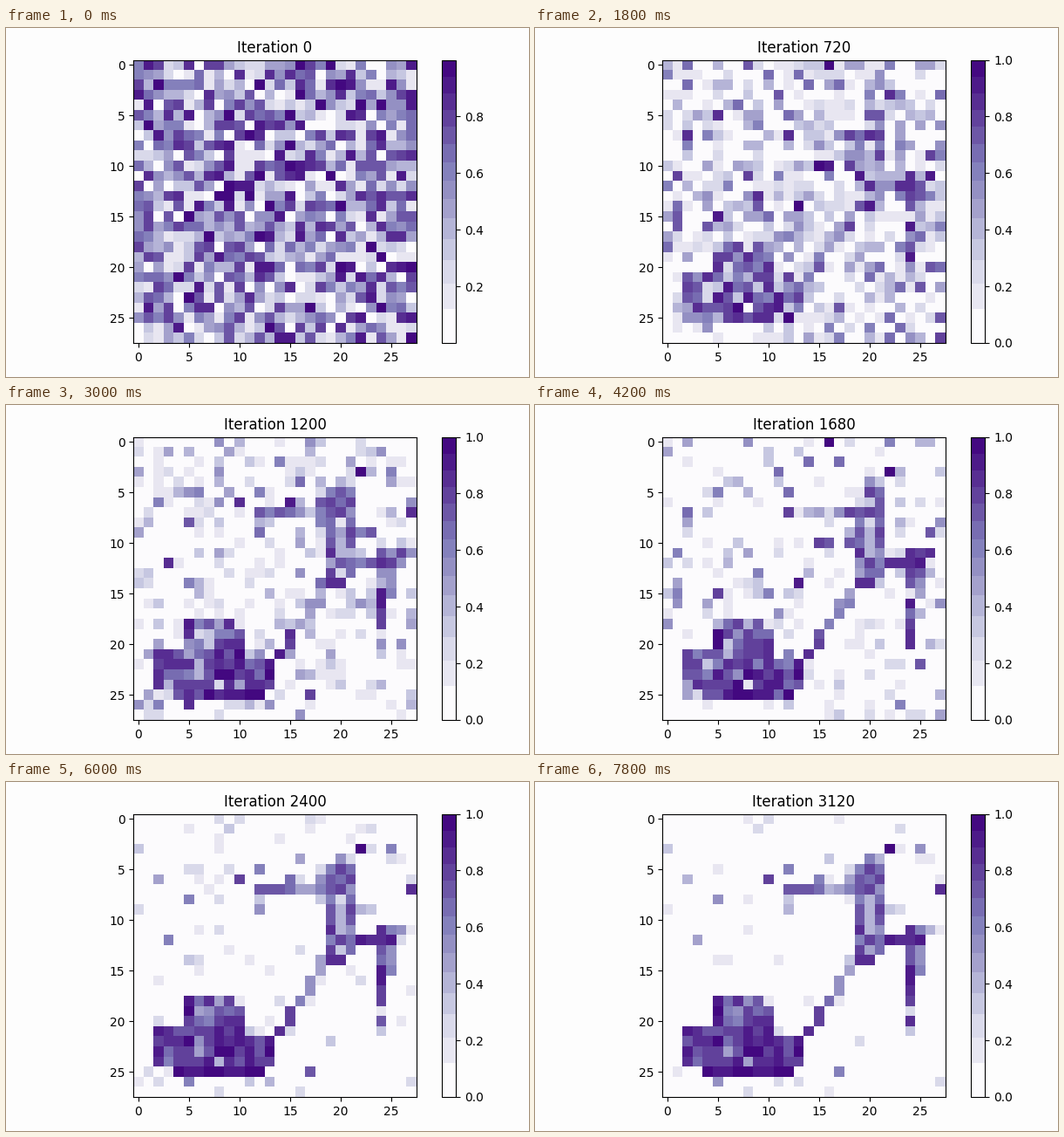
A matplotlib script for the animation above (8 s loop, 600 px wide and 400 px high).

```python
import numpy as np
import matplotlib.pyplot as plt
from matplotlib.animation import FuncAnimation
from matplotlib.colors import ListedColormap

SIZE, FRAMES, STEP = 28, 40, 80
W, H = 600, 400


def banded_purples(count=14):
    """Purples in flat bands, wider towards the light end."""
    x = np.linspace(0, 1, 512)
    band = np.minimum(np.floor(x ** 1.25 * count), count - 1)
    shade = np.where(band > 0, ((band + .5) / count) ** .8, 0)
    return ListedColormap(plt.colormaps["Purples"](shade))


def sandal(rng):
    img = np.zeros((SIZE, SIZE))

    def part(rows, cols, low, high):
        """Fill a block of cells, last row and column included."""
        (r0, r1), (c0, c1) = rows, cols
        shape = (r1 - r0 + 1, c1 - c0 + 1)
        img[r0:r1 + 1, c0:c1 + 1] = rng.uniform(low, high, shape)

    def slope(start, end, low, high):
        """Shade a slanted run of cells, one per row."""
        (r0, c0), (r1, c1) = start, end
        for t in np.linspace(0, 1, r1 - r0 + 1):
            row, col = r0 + (r1 - r0) * t, c0 + (c1 - c0) * t
            img[round(row), round(col)] = low + (high - low) * t

    # toe
    part((18, 20), (5, 9), .5, .85)
    part((18, 20), (5, 5), .85, 1)
    part((19, 21), (10, 10), .65, .95)
    part((21, 21), (2, 9), .7, .95)
    part((22, 23), (2, 13), .7, .98)
    part((24, 24), (2, 13), .7, .95)
    part((25, 25), (4, 12), .9, 1)
    # arch, ankle and straps
    slope((15, 18), (21, 14), .45, .85)
    slope((3, 22), (5, 20), .95, .8)
    part((4, 6), (20, 21), .7, .95)
    part((5, 13), (19, 21), .55, .9)
    part((9, 11), (20, 20), .4, .45)
    part((14, 14), (19, 20), .8, .95)
    part((7, 7), (12, 18), .4, .8)
    # heel
    part((12, 12), (22, 23), .8, 1)
    part((11, 12), (24, 25), .8, .95)
    part((13, 15), (25, 25), .45, .65)
    part((13, 20), (24, 24), .7, .92)
    return img


class Family:
    """A line of candidates that drifts from noise to the sandal."""

    def __init__(self, seed):
        rng = np.random.default_rng(seed)
        shape = (SIZE, SIZE)
        self.goal = sandal(np.random.default_rng(4))
        self.noise = rng.random(shape)
        self.hold = rng.random(shape)
        self.phase = rng.integers(0, 6, shape)

    def at(self, k):
        # each cell improves in jumps, every sixth step
        age = (k + self.phase) // 6 * 6 - self.phase + 2
        age = np.clip(age, 0, k)
        weight = self.hold ** (.09 * age + .006 * age ** 2)
        return self.goal + (self.noise - self.goal) * weight


main, rival = Family(7), Family(23)


def best(k):
    return (rival if k % 8 >= 6 else main).at(k)


fig = plt.figure(figsize=(W / 100, H / 100), dpi=100, facecolor="#fdfdfd")
ax = fig.add_axes([146.2 / W, 39 / H, 324.5 / W, 324.5 / H])
cax = fig.add_axes([500.2 / W, 39 / H, 16.2 / W, 324.5 / H])
im = ax.imshow(best(0), cmap=banded_purples(), vmin=0, vmax=1)
fig.colorbar(im, cax=cax)
title = ax.set_title("Iteration 0")


def draw(k):
    im.set_data(best(k))
    # the first, untouched noise falls just short of 0 and 1
    margin = .0015 if k == 0 else 0
    im.set_clim(margin, 1 - margin)
    title.set_text(f"Iteration {k * STEP}")
    return im, title


anim = FuncAnimation(fig, draw, frames=FRAMES, interval=200,
                     repeat=True, repeat_delay=0, blit=False)
plt.show()
```
